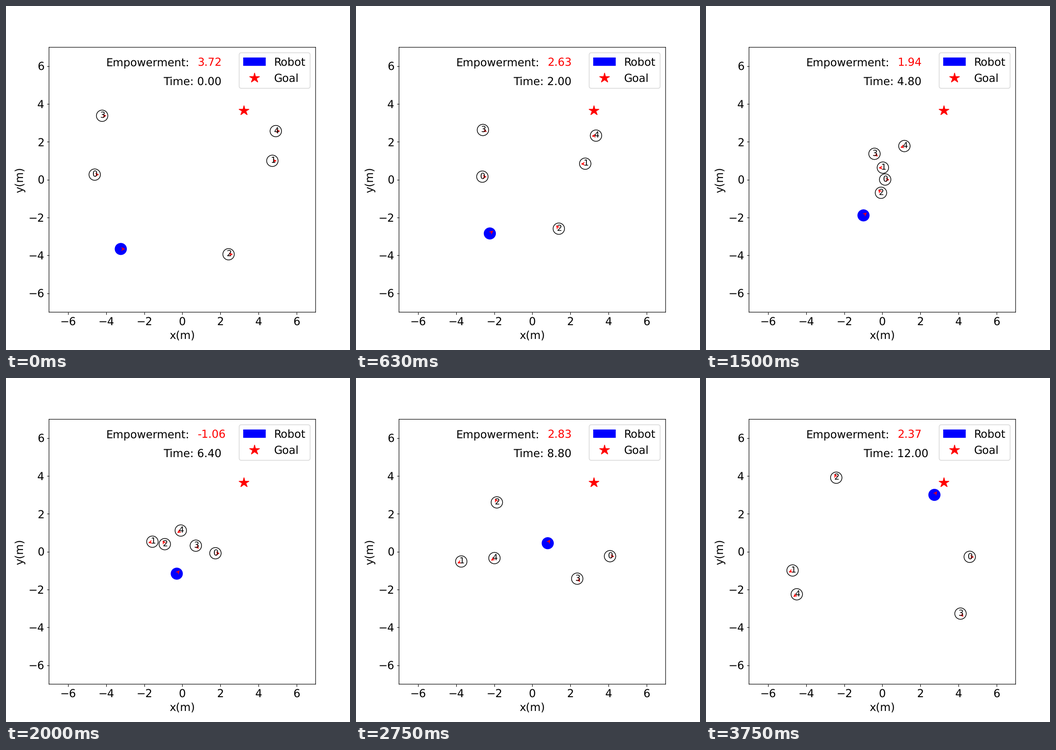
These frames come from a looping animation (748x748 px, 3880 ms). A matplotlib script:

```python
import numpy as np
import matplotlib.pyplot as plt
from matplotlib.animation import FuncAnimation
from matplotlib.lines import Line2D
from matplotlib.patches import ArrowStyle, Circle, FancyArrowPatch

STEPS, DT, RADIUS = 31, 0.4, 0.3
STEP_MS, TICK_MS, LOOP_MS = 125, 40, 3880

# Start and two crossing points; then each agent heads straight for its goal,
# which lies opposite its start.
HUMAN_KEYS = [0, 12, 16]
HUMANS = [
    [(-4.6, 0.27), (0.15, 0.01), (1.74, -0.08)],
    [(4.73, 1.0), (0.03, 0.64), (-1.57, 0.53)],
    [(2.43, -3.94), (-0.07, -0.69), (-0.92, 0.4)],
    [(-4.21, 3.38), (-0.41, 1.37), (0.71, 0.32)],
    [(4.91, 2.57), (1.16, 1.78), (-0.08, 1.12)],
]
ROBOT_KEYS = [0, 5, 16, 22]
ROBOT = [(-3.23, -3.66), (-2.23, -2.84), (-0.29, -1.16), (0.81, 0.45)]

EMPOWERMENT = np.interp(range(STEPS), [0, 5, 12, 16, 22, 26, 30],
                        [3.72, 2.63, 1.94, -1.06, 2.83, 2.57, 2.37])


def advance(pos, goal):
    """One step towards the goal at unit speed, slowing within unit distance."""
    gap = goal - pos
    return DT * gap / max(1, np.hypot(*gap))


def track(keys, points):
    """Smooth curve through the points, then straight to the goal."""
    pts = np.array(points)
    goal = -pts[0]
    slope = np.gradient(pts, keys, axis=0)
    slope[-1] = advance(pts[-1], goal)
    path = []
    for k in range(keys[-1]):
        i = np.searchsorted(keys, k, side="right") - 1
        h = keys[i + 1] - keys[i]
        u = (k - keys[i]) / h
        path.append((1 + 2 * u) * (1 - u) ** 2 * pts[i]
                    + u * (1 - u) ** 2 * h * slope[i]
                    + u * u * (3 - 2 * u) * pts[i + 1]
                    + u * u * (u - 1) * h * slope[i + 1])
    path.append(pts[-1])
    while len(path) < STEPS:
        path.append(path[-1] + advance(path[-1], goal))
    return np.array(path)


def headings(path):
    """Direction of the last move; agents at rest face right."""
    d = np.diff(path, axis=0)
    return np.concatenate([[0], np.arctan2(d[:, 1], d[:, 0])])


paths = [track(ROBOT_KEYS, ROBOT)] + [track(HUMAN_KEYS, h) for h in HUMANS]
angles = [headings(p) for p in paths]

# Keep lines and glyphs at their exact sub-pixel sizes.
plt.rcParams.update({"path.snap": False, "text.hinting": "no_hinting",
                     "font.size": 16})
fig, ax = plt.subplots(figsize=(7, 7), dpi=748 / 7)
ax.set(xlim=(-7, 7), ylim=(-7, 7), xlabel="x(m)", ylabel="y(m)",
       xticks=range(-6, 7, 2), yticks=range(-6, 7, 2))

goal = Line2D(*-paths[0][:1].T, color="red", marker="*", linestyle="None",
              markersize=15)
ax.add_artist(goal)

bodies = [Circle(p[0], RADIUS, color="blue") if n == 0
          else Circle(p[0], RADIUS, fill=False)
          for n, p in enumerate(paths)]
style = ArrowStyle("->", head_length=4, head_width=2)
arrows = [FancyArrowPatch(p[0], p[0] + (RADIUS, 0), color="red",
                          arrowstyle=style) for p in paths]
for patch in bodies + arrows:
    ax.add_patch(patch)
numbers = [ax.text(0, 0, str(n), fontsize=12) for n in range(len(HUMANS))]

ax.legend([bodies[0], goal], ["Robot", "Goal"], loc="upper right")
ax.text(-4, 6, "Empowerment:")
value = ax.text(0.8, 6, "", color="red")
clock = ax.text(-1, 5, "")


def update(tick):
    k = min((tick * TICK_MS + 30) // STEP_MS, STEPS - 1)
    for path, angle, body, arrow in zip(paths, angles, bodies, arrows):
        pos, a = path[k], angle[k]
        body.center = pos
        arrow.set_positions(pos, pos + RADIUS * np.array([np.cos(a), np.sin(a)]))
    for path, number in zip(paths[1:], numbers):
        number.set_position(path[k] - 0.11)
    value.set_text(f"{EMPOWERMENT[k]:.2f}")
    clock.set_text(f"Time: {k * DT:.2f}")
    return bodies + arrows + numbers + [value, clock]


anim = FuncAnimation(fig, update, frames=LOOP_MS // TICK_MS, interval=TICK_MS,
                     repeat=True, repeat_delay=0)
plt.show()
```
